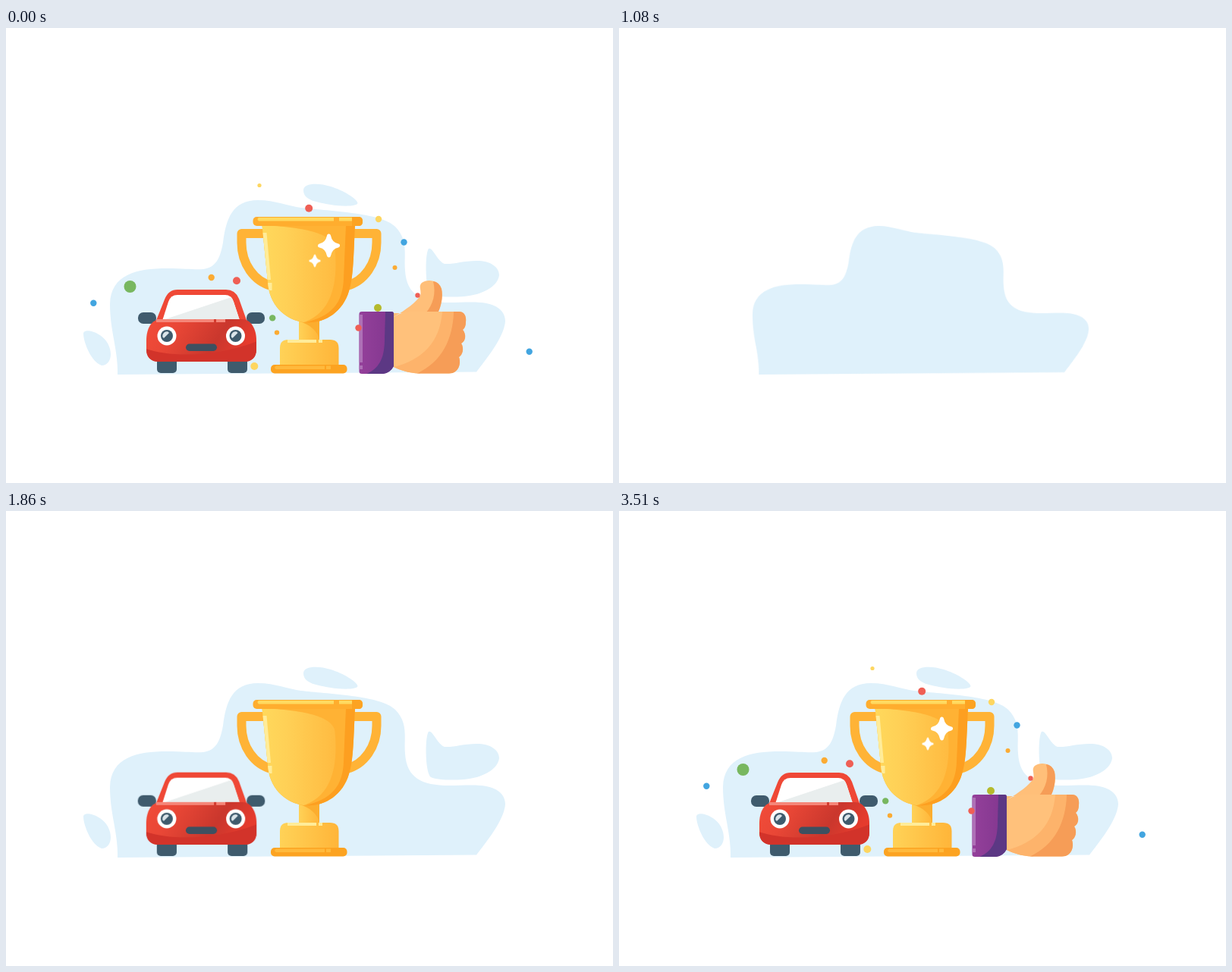
Recreate the animation shown at these times as an HTML page. Size 800x600 px, loop 4.41 s.

```html
<!DOCTYPE html>
<html lang="en">
<head>
<meta charset="utf-8">
<title>Car, trophy and thumb</title>
<style>
html, body { margin: 0; width: 100%; height: 100%; overflow: hidden; background: #fff; }
svg { display: block; width: 100vw; height: 100vh; }

#scene, .part, .blob, .pops > * {
  animation: 4410ms linear infinite both;
}
#scene { animation-name: fade; }
#cloud { animation-name: cloud; transform-origin: 397.5px 457px; }
#trophy { animation-name: trophy; transform-origin: 399.5px 455px; }
#car { animation-name: car; transform-origin: 257.5px 455px; }
#thumb { animation-name: thumb; transform-origin: 511px 455px; }
.blob, .pops > * { transform-box: fill-box; transform-origin: center; }
.blob { animation-name: blob; }
#cloud, .blob { fill: #dff1fb; }
.blob:nth-of-type(3) { animation-delay: 30ms; }
.blob:nth-of-type(4) { animation-delay: 60ms; }
.pops > * { animation-name: pop; }
.pops > :nth-child(4n + 2) { animation-delay: 40ms; }
.pops > :nth-child(4n + 3) { animation-delay: 80ms; }
.pops > :nth-child(4n) { animation-delay: 120ms; }

@keyframes fade {
  0%, 1.36% { opacity: 1; }
  12.93%, 21.77% { opacity: 0; }
  21.78%, 100% { opacity: 1; }
}
/* Each part is hidden while the scene is blank, then springs back in. */
@keyframes cloud {
  0%, 15% { transform: scale(1); }
  15.01%, 22.22% { transform: scale(0); animation-timing-function: cubic-bezier(.333, 1.307, .667, 1); }
  28.93%, 100% { transform: scale(1); }
}
@keyframes blob {
  0%, 15% { transform: scale(1); opacity: 1; }
  15.01%, 28.57% { transform: scale(0); opacity: 0; animation-timing-function: ease-out; }
  32.5%, 100% { transform: scale(1); opacity: 1; }
}
@keyframes trophy {
  0%, 15% { transform: scale(1); }
  15.01%, 34.58% { transform: scale(0); animation-timing-function: cubic-bezier(.333, 1.367, .667, 1); }
  40.14%, 100% { transform: scale(1); }
}
@keyframes car {
  0%, 15% { transform: scale(1); }
  15.01%, 36.96% { transform: scale(0); animation-timing-function: cubic-bezier(.333, 1.367, .667, 1); }
  42.52%, 100% { transform: scale(1); }
}
@keyframes thumb {
  0%, 15% { transform: scale(1); }
  15.01%, 42.4% { transform: scale(0); animation-timing-function: ease-out; }
  46.6%, 100% { transform: scale(1); }
}
@keyframes pop {
  0%, 15% { transform: scale(1); }
  15.01%, 46.49% { transform: scale(0); animation-timing-function: cubic-bezier(.333, 1.367, .667, 1); }
  51%, 100% { transform: scale(1); }
}
</style>
</head>
<body>
<svg viewBox="0 0 800 600">
  <defs>
    <linearGradient id="bowlShine"><stop stop-color="#ffd95c"/><stop offset=".35" stop-color="#ffd056"/><stop offset="1" stop-color="#ffbb41"/></linearGradient>
    <linearGradient id="baseShine"><stop stop-color="#ffd257"/><stop offset="1" stop-color="#ffb539"/></linearGradient>
    <linearGradient id="paint" x2="1" y2=".25"><stop stop-color="#f24c39"/><stop offset=".3" stop-color="#e94736"/><stop offset=".72" stop-color="#ca372d"/><stop offset="1" stop-color="#e53b2d"/></linearGradient>
    <linearGradient id="sleeve"><stop stop-color="#94409a"/><stop offset="1" stop-color="#81368f"/></linearGradient>
    <path id="bowl" d="M337.500 260H460C458 300 458 329 452 347C444 374 421 388.500 399 388.500C371 388 349 368 345.500 340Z"/>
    <path id="body" d="M185 412C185 396 192 384 204 384H311C323 384 330 397 330 412V424C330 434 324 440 314 440H201C191 440 185 434 185 424Z"/>
    <path id="palm" d="M511 381C519 376 527 374 536 374H597C604 374 607 380 606 388Q606 395 602 398C607 404 606 413 600 416C604 422 602 431 597 434C600 442 597 455.500 584 455.500H545C530 455 519 451 511 447Z"/>
    <path id="cuff" d="M469 374H508Q511 374 511 377V446Q506 455 497 456H469Q465.500 456 465.500 453V377Q465.500 374 469 374Z"/>
    <clipPath id="inBowl"><use href="#bowl"/></clipPath>
    <clipPath id="inBody"><use href="#body"/></clipPath>
    <clipPath id="inPalm"><use href="#palm"/></clipPath>
    <clipPath id="inCuff"><use href="#cuff"/></clipPath>
    <g id="lamp">
      <circle r="12.500" fill="#fff"/>
      <circle r="8" fill="#3f5b6d"/>
      <path d="M-5.500 1.500A5.800 5.800 0 0 1 1.500 -5.500L3 -4L-4 3Z" fill="#dbe5ea"/>
    </g>
    <path id="handle" d="M342 271H310.500V283C310.500 311 327 334 350 340" fill="none" stroke="#ffb336" stroke-width="12" stroke-linejoin="round"/>
    <path id="spark" d="M0 -13Q2 -2 12 0Q2 2 0 13Q-2 2 -12 0Q-2 -2 0 -13Z" fill="#fff" stroke="#fff" stroke-width="5" stroke-linejoin="round"/>
  </defs>

  <g id="scene">
    <path id="cloud" class="part" d="M147 457C148 425 137 400 137 364C138 325 172 317 212 317C238 317 248 319 260 318C275 316 282 306 286 283C290 252 298 227 332 227C355 227 372 235 389 237C420 241 495 243 513 262C531 280 524 300 526 320C528 352 548 362 584 362C600 362 612 361 625 362C643 363 658 371 658 387C656 407 638 430 620 453.500Z"/>
    <path class="blob" d="M392 214C392 204 412 204 428 209C444 214 463 225 463.500 231C462 236 440 235 428 233C412 230 392 228 392 214Z"/>
    <path class="blob" d="M102 403C102 398 112 398 122 404C136 412 138 425 138 430C138 438 134 445 126 445C112 440 102 414 102 403Z"/>
    <path class="blob" d="M557 291C562 288 568 307 578 311C590 312 605 306 624 307C640 308 650 316 650 326C648 342 625 354 595 354.500C580 355 567 354 560 351C552 345 552 297 557 291Z"/>

    <g id="trophy" class="part">
      <use href="#handle"/>
      <use href="#handle" transform="matrix(-1 0 0 1 799 0)"/>
      <rect x="386" y="386" width="27" height="27" fill="url(#baseShine)"/>
      <path d="M387 387H413V411C411 400 401 391 387 387Z" fill="#fcad2e"/>
      <use href="#bowl" fill="#ffb234"/>
      <g clip-path="url(#inBowl)">
        <path d="M336 260C380 262 431 268 433.500 291C438 340 428 377 390 389H336Z" fill="url(#bowlShine)"/>
        <path d="M448 260H462V390H385C428 383 444 364 445 330Z" fill="#fd9f20"/>
        <path d="M338 270H343.500L349 332H342ZM344 336H350.500V346H345Z" fill="#ffec99"/>
      </g>
      <rect x="325.500" y="249" width="144.500" height="12" rx="5" fill="#ffad2e"/>
      <path d="M456 249H465Q470 249 470 255T465 261H456Z" fill="#fca322"/>
      <path d="M333 250H432V254.500H333Q330 252 333 250ZM439 250H456V254.500H439Z" fill="#ffda60"/>
      <path d="M361 445V422Q361 411 372 411H427Q438.500 411 438.500 422V445Z" fill="url(#baseShine)"/>
      <path d="M371 411H409V415H371ZM412 411H417V415H412Z" fill="#ffec99"/>
      <rect x="349" y="444" width="100.500" height="11.500" rx="5" fill="#fca321"/>
      <path d="M356 445.500H420V450H356Q352 448 356 445.500ZM422 445.500H428V450H422Z" fill="#ffb93c"/>
    </g>

    <g id="car" class="part">
      <g fill="#3f5b6d">
        <rect x="174" y="375" width="24" height="15" rx="7"/>
        <rect x="317" y="375" width="24" height="15" rx="7"/>
        <rect x="199" y="430" width="26" height="25" rx="5"/>
        <rect x="292" y="430" width="26" height="25" rx="5"/>
      </g>
      <path d="M197 388L209 358Q214 345 226 345H290Q302 345 307 357L318 388Z" fill="#ef4836"/>
      <path d="M206 386L214 361Q217 352 226 352H289Q297 352 300 361L308 386Z" fill="#fff"/>
      <path d="M207 385L297 355Q299 358 300 361L308 385Z" fill="#e9eeee"/>
      <use href="#body" fill="url(#paint)"/>
      <path clip-path="url(#inBody)" d="M184 423C215 434 275 435 331 413V441H184Z" fill="#d2332a"/>
      <path d="M198 384H274V388H198ZM277 384H289V388H277Z" fill="#f58679"/>
      <use href="#lamp" x="212" y="406"/>
      <use href="#lamp" x="302.500" y="406"/>
      <rect x="237" y="416.500" width="41" height="9.500" rx="4.700" fill="#3d5060"/>
    </g>

    <g id="thumb" class="part">
      <path d="M511 381C528 371 540 362 546 353C548 345 543 341 548 336C556 330 571 333 574 344C576 354 574 366 569 376H511Z" fill="#ffbf79"/>
      <path d="M563 334C567 350 563 365 553 376H569C574 366 576 354 574 344Q571 335 563 334Z" fill="#f69d57"/>
      <use href="#palm" fill="#ffc17b"/>
      <g clip-path="url(#inPalm)">
        <path d="M575 374C572 415 548 438 511 447V456H545C578 440 590 410 590 374Z" fill="#fdb36b"/>
        <path d="M590 374H610V456H541C575 440 589 410 590 374Z" fill="#f69d57"/>
      </g>
      <use href="#cuff" fill="url(#sleeve)"/>
      <g clip-path="url(#inCuff)">
        <path d="M500 374H512V457H473C494 449 499 432 499 410Z" fill="#5c3884"/>
        <path d="M465 378H470V441H465ZM465 445H470V450H465Z" fill="#ae70b6"/>
      </g>
    </g>

    <g class="pops">
      <g><use href="#spark" x="425.500" y="287"/></g>
      <g><use href="#spark" transform="translate(407 307) scale(.53)"/></g>
      <circle cx="334" cy="207.500" r="2.600" fill="#fdd660"/>
      <circle cx="399.200" cy="237.800" r="5" fill="#ef5f55"/>
      <circle cx="491" cy="252" r="4.200" fill="#fdd660"/>
      <circle cx="524.500" cy="282.500" r="4.200" fill="#42a5e0"/>
      <circle cx="512.500" cy="316" r="3" fill="#fbab33"/>
      <circle cx="163.500" cy="341" r="8" fill="#78b75f"/>
      <circle cx="304" cy="333.200" r="5" fill="#ef5f55"/>
      <circle cx="270.700" cy="329" r="4.200" fill="#fbab33"/>
      <circle cx="115.300" cy="362.700" r="4.200" fill="#42a5e0"/>
      <circle cx="351.200" cy="382.400" r="4.200" fill="#78b75f"/>
      <circle cx="357" cy="401.600" r="3.200" fill="#fbab33"/>
      <circle cx="327.300" cy="446" r="5" fill="#fdd660"/>
      <circle cx="464.500" cy="395.500" r="4.200" fill="#ef5f55"/>
      <circle cx="490" cy="369" r="5" fill="#b5ba2d"/>
      <circle cx="542.500" cy="352.500" r="3.200" fill="#ef5f55"/>
      <circle cx="689.700" cy="426.700" r="4.200" fill="#42a5e0"/>
    </g>
  </g>
</svg>
</body>
</html>
```
